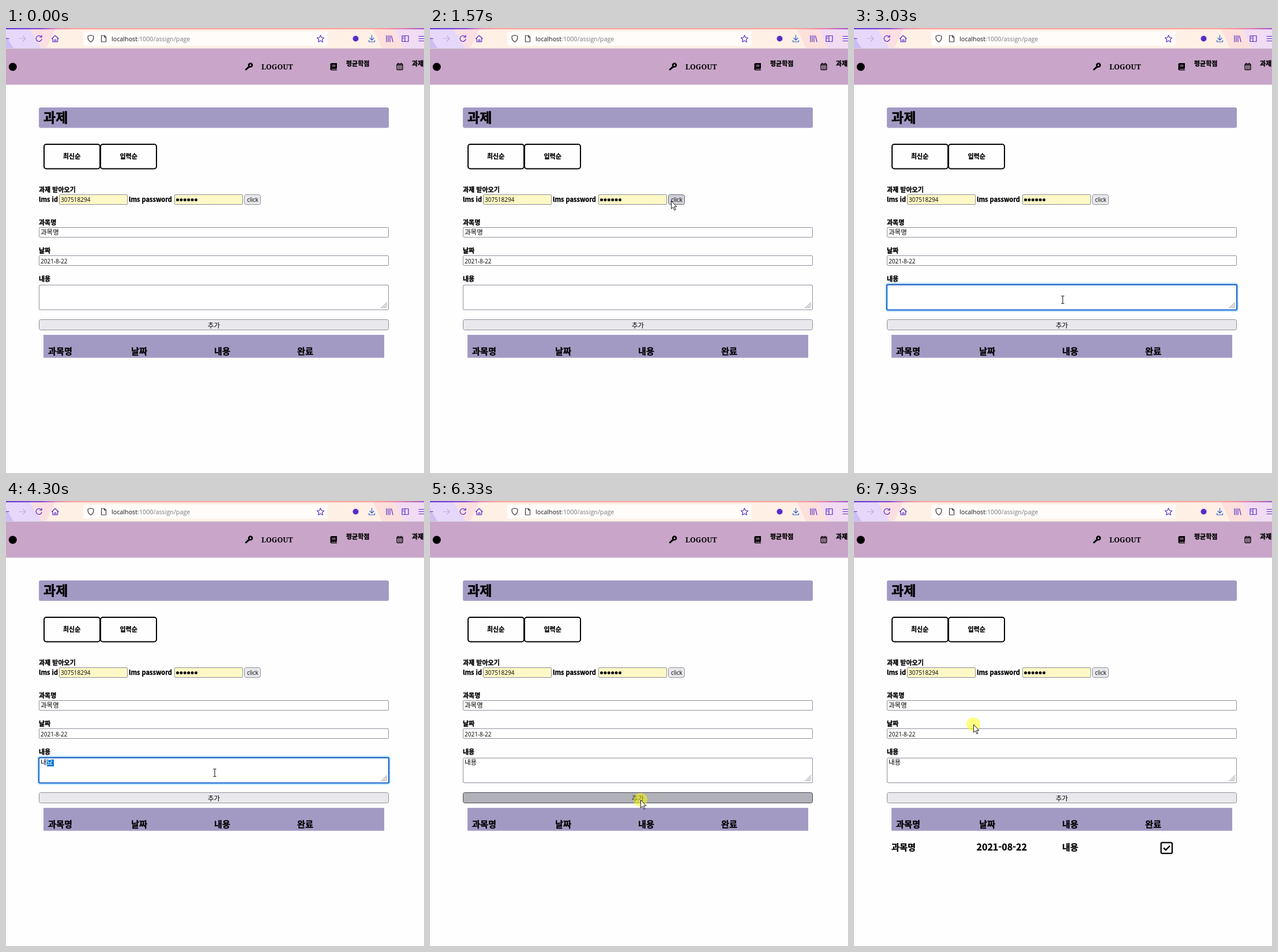
Write an HTML page that moves like this. It is 725 px wide and 773 px high and loops after 7.99 s.

```html
<!DOCTYPE html>
<html lang="ko">
<head>
<meta charset="utf-8">
<title>과제</title>
<style>
  html, body { margin: 0; width: 100%; height: 100%; overflow: hidden; background: #fefefe; }
  svg { display: block; width: 100vw; height: 100vh; }
  text { white-space: pre; }
  .ko { font: bold 11px "Noto Sans CJK KR", "Noto Sans CJK JP", sans-serif; stroke: #000; stroke-width: .3; }
  .big { font-size: 23px; stroke-width: .5; }
  .cell { font-size: 15.2px; }
  .date { font-size: 16px; }
  .in { font: 11.5px "Noto Sans CJK KR", "Noto Sans CJK JP", sans-serif; }
  .num { font: 10px "Open Sans", "Noto Sans", sans-serif; }
  .url { font: 10.75px "Open Sans", "Noto Sans", sans-serif; fill: #15141a; }
  .logout { font: bold 12.4px "Noto Serif", serif; }
  .line { fill: none; stroke: #592acb; stroke-width: 1.2; stroke-linecap: round; stroke-linejoin: round; }
  .field { fill: #fff; stroke: #8f8f9d; }
  .auto { fill: #fdf8c5; }
  .btn { fill: #e9e9ed; stroke: #8f8f9d; }
  .hover { stroke: #676774; }
  .btn.hover { fill: #d0d0d7; }
  .btn.press { fill: #b1b1b9; stroke: #484851; }
</style>
</head>
<body>
<svg viewBox="0 0 725 773" preserveAspectRatio="none">
  <defs>
    <linearGradient id="strip">
      <stop offset="0" stop-color="#6a3fd0"/><stop offset=".085" stop-color="#8a4fd6"/>
      <stop offset=".12" stop-color="#e58bb4"/><stop offset=".16" stop-color="#f9a59c"/>
      <stop offset=".88" stop-color="#f9a59c"/><stop offset=".94" stop-color="#ea86a6"/>
      <stop offset="1" stop-color="#a45bd0"/>
    </linearGradient>
  </defs>

  <!-- browser bar -->
  <rect width="725" height="773" fill="#fefefe"/>
  <rect width="725" height="35" fill="#fff0e6"/>
  <path d="M0 0H40L62 35H0z" fill="#e6d8fb"/>
  <path d="M40 0H86L70 35H62z" fill="#fbdfe2"/>
  <path d="M636 0H672L690 35H652z" fill="#fde0dc"/>
  <path d="M672 0H725V35H690z" fill="#f1dcf3"/>
  <path d="M0 14L13 35H0z" fill="#cdbdf0"/>
  <rect width="725" height="2.3" fill="url(#strip)"/>
  <path d="M0 35.5H725" stroke="#d9d2da"/>
  <rect x="134" y="6" width="424" height="25" rx="3" fill="#fffcfa"/>
  <g class="line">
    <path d="M-2 18.500H5"/>
    <path d="M23 18.500H34M29.500 14l4.500 4.500l-4.500 4.500" stroke="#c3b0dc"/>
    <path d="M61.300 15.500A5 5 0 1 0 62 19.500M62 12.500V16H58.500"/>
    <path d="M79.500 18.500L85.300 13L91 18.500M81 17.500V24H89.600V17.500M84 24V20.500H86.700V24"/>
    <path d="M147 12.500L152 14.200C152.300 19.500 150.500 22.500 147 24.500C143.500 22.500 141.700 19.500 142 14.200z" stroke="#3c3846"/>
    <path d="M165.500 13H170.500L173.500 16V24H165.500zM170.500 13V16H173.500" stroke="#3c3846"/>
    <path d="M545.500 12.500l1.800 4l4.300 .5l-3.200 2.900l.9 4.300l-3.800-2.200l-3.800 2.200l.9-4.300l-3.200-2.900l4.300-.5z"/>
    <path d="M634.500 12.500V20.500M631 17.500l3.500 3.500l3.500-3.500M629.500 21.500V24H639.500V21.500" stroke="#2f5fd0"/>
    <path d="M660 13V24M663 13V24M666 13V24M668.500 13.500L671 24"/>
    <path d="M687 13.500H698V23.500H687zM692 13.500V23.500M688.800 16H690M688.800 18.500H690"/>
    <path d="M716 14.500H726M716 18.500H726M716 22.500H726"/>
  </g>
  <circle cx="606.500" cy="18.500" r="5" fill="#592acb"/>
  <text class="url" x="183" y="23">localhost<tspan fill="#7b7880">:1000/assign/page</tspan></text>

  <!-- navigation -->
  <rect y="36" width="725" height="62.500" fill="#c9a6c9"/>
  <circle cx="11.700" cy="67.500" r="7"/>
  <circle cx="424" cy="64.500" r="2.900" fill="none" stroke="#000" stroke-width="2.700"/>
  <path d="M421 65.500L414.800 71.500V73.300H418V71.800H419.500V70.200H421L423.500 67.500z"/>
  <path d="M564.500 61H574V70.500H573V72.200H574V73.500H564.500Q562.500 73.500 562.500 71.500V63Q562.500 61 564.500 61z"/>
  <path d="M565.500 64.500H571.500M565.500 66.700H571.500M565 71.600H572.500" stroke="#c9a6c9"/>
  <rect x="678" y="62.500" width="10" height="10" rx="1" fill="none" stroke="#000" stroke-width="1.300"/>
  <path d="M678 64.500H688M680.500 60.500V63M685.500 60.500V63" stroke="#000" stroke-width="1.500"/>
  <path d="M680 67.500H686.500M680 70H686.500" stroke="#000" stroke-width="1.400" stroke-dasharray="1.500 1"/>
  <text class="logout" x="443" y="72">LOGOUT</text>
  <text class="ko" x="590" y="66">평균학점</text>
  <text class="ko" x="704" y="66">과제</text>

  <!-- page -->
  <rect x="57" y="138" width="607" height="35.500" rx="3" fill="#a39ac4"/>
  <text class="ko big" x="65" y="163.500">과제</text>
  <g fill="none" stroke="#000" stroke-width="2">
    <rect x="66" y="202" width="97" height="42.500" rx="4"/>
    <rect x="164" y="202" width="97" height="42.500" rx="4"/>
  </g>
  <text class="ko" x="99" y="227">최신순</text>
  <text class="ko" x="197.500" y="227">입력순</text>
  <text class="ko" x="57" y="285">과제 받아오기</text>
  <text class="ko" x="57" y="302">lms id</text>
  <text class="ko" x="213" y="302">lms password</text>
  <text class="ko" x="57" y="342">과목명</text>
  <text class="ko" x="57" y="391">날짜</text>
  <text class="ko" x="57" y="440">내용</text>
  <g id="boxes"></g>
  <text class="num" x="95" y="302">307518294</text>
  <g id="dots"></g>
  <text class="num" x="418" y="302">click</text>
  <text class="in" x="60" y="359">과목명</text>
  <text class="num" x="60" y="408.500">2021-8-22</text>
  <text class="in" x="350" y="520.500">추가</text>
  <path d="M650.500 487L661 476.500M654 487L661 480M657.500 487L661 483.500" stroke="#75757e" stroke-width="1"/>
  <g id="ring" fill="none">
    <rect x="55" y="443.500" width="611" height="48.500" rx="4" stroke="#a9dcfa" stroke-width="1.500"/>
    <rect x="57" y="445.700" width="607" height="44" rx="2" stroke="#1463cf" stroke-width="2"/>
  </g>
  <rect id="mark" y="449" height="12" fill="#0078d7"/>
  <text class="in" y="458"><tspan id="done" x="60"></tspan><tspan id="typing" fill="#fff"></tspan></text>
  <path id="caret" d="M60.500 449V461" stroke="#000"/>

  <!-- table -->
  <rect x="65" y="533" width="591" height="39.800" fill="#a39ac4"/>
  <g class="ko cell">
    <text x="73" y="567">과목명</text><text x="217" y="567">날짜</text>
    <text x="361" y="567">내용</text><text x="505" y="567">완료</text>
  </g>
  <g id="row">
    <g class="ko cell">
      <text x="65" y="607">과목명</text><text class="date" x="212.500" y="607">2021-08-22</text>
      <text x="361" y="607">내용</text>
    </g>
    <rect x="532.600" y="593.300" width="19.200" height="18.800" rx="2" fill="none" stroke="#000" stroke-width="2.300"/>
    <path d="M537 602.500L540.800 606.300L547.800 599" fill="none" stroke="#000" stroke-width="2.500"/>
  </g>

  <!-- pointer -->
  <g id="pointer">
    <circle id="glow" r="12" fill="#ff0" fill-opacity=".5"/>
    <path id="arrow" d="M.5 .5V14L3.600 11.200L5.900 16.500L8 15.600L5.700 10.400H9.800z" fill="#fff" stroke="#000" stroke-width=".9"/>
    <path id="beam" d="M-2.500 -6.500H-.7L0 -6L.7 -6.500H2.500M0 -6V6M-2.500 6.500H-.7L0 6L.7 6.500H2.500" fill="none" stroke="#000"/>
  </g>
</svg>
<script>
const LOOP = 7990;
const $ = id => document.getElementById(id);
const NS = 'http://www.w3.org/2000/svg';

function add(parent, tag, attrs) {
  const el = document.createElementNS(NS, tag);
  for (const k in attrs) el.setAttribute(k, attrs[k]);
  return parent.appendChild(el);
}

// x, y, width, height, class
const boxes = [
  [92, 289, 118, 17, 'field auto'],
  [292, 289, 118, 17, 'field auto'],
  [413, 289, 28, 17, 'btn'],
  [57, 346, 606, 17, 'field'],
  [57, 395, 606, 17, 'field'],
  [57, 446, 606, 43, 'field'],
  [57, 506, 606, 18, 'btn']
].map(([x, y, w, h, cls]) => ({
  x, y, w, h, cls,
  el: add($('boxes'), 'rect', {
    x: x + .5, y: y + .5, width: w, height: h, rx: cls === 'btn' ? 3 : 1.5, class: cls
  })
}));
for (let i = 0; i < 6; i++) add($('dots'), 'circle', { cx: 297.5 + 6.4 * i, cy: 298.5, r: 2.5 });

// Pointer runs: start, step length, then one x, y pair per step
const runs = [
  [170, 71, [673,744, 642,722, 602,694, 553,659, 503,622, 458,587, 422,558, 394,533,
             370,490, 372,455, 390,415, 412,380]],
  [1020, 68.5, [415,358, 417,338, 418,320, 418,308, 418,303, 418,300]],
  [1760, 67.2, [417,304, 412,322, 403,350, 392,383, 380,417, 370,446, 364,465, 362,472]],
  [5770, 70, [363,500, 365,513, 365,519]],
  [7460, 68, [358,514, 336,496, 300,466, 260,432, 225,402, 207,388]]
];
const clicks = [[1430, 1570], [2500, 2570], [6330, 6530], [7930, LOOP]];

// Time, committed text, text being composed
const typed = [
  [0, '', ''], [3630, '', 'ㄴ'], [4030, '', '내'], [4230, '', '냉'],
  [4300, '내', '요'], [4560, '내', '용'], [6330, '내용', '']
];

const within = (t, a, b) => t >= a && t < b;
const show = (id, on) => { $(id).style.display = on ? '' : 'none'; };

function pointerAt(t) {
  const run = runs.filter(r => t >= r[0]).pop();
  if (!run) return null;
  const [start, step, pts] = run;
  const i = Math.min(pts.length / 2 - 1, Math.floor((t - start) / step + .01));
  return { x: pts[2 * i], y: pts[2 * i + 1] };
}

function draw(t) {
  const p = pointerAt(t);
  const pressed = clicks.some(c => within(t, ...c));
  let over = null;
  for (const b of boxes) {
    const hit = p && within(p.x, b.x, b.x + b.w + 1) && within(p.y, b.y, b.y + b.h + 1);
    if (hit) over = b;
    b.el.setAttribute('class', b.cls + (hit ? ' hover' : '') + (hit && pressed ? ' press' : ''));
  }

  show('pointer', p);
  if (p) $('pointer').setAttribute('transform', `translate(${p.x} ${p.y})`);
  const text = over && over.cls !== 'btn';
  show('arrow', !text);
  show('beam', text);
  show('glow', pressed);

  const [, done, typing] = typed.filter(s => t >= s[0]).pop();
  $('done').textContent = done;
  $('typing').textContent = typing;
  show('mark', typing);
  $('mark').setAttribute('x', done ? 71 : 60);
  $('mark').setAttribute('width', 12);
  show('ring', within(t, 2500, 6330));
  show('caret', within(t, 2500, 3030) || within(t, 3500, 3630));
  show('row', t >= 7130);
}

const begin = performance.now();
function tick() {
  draw((performance.now() - begin) % LOOP);
  requestAnimationFrame(tick);
}
tick();
</script>
</body>
</html>
```
